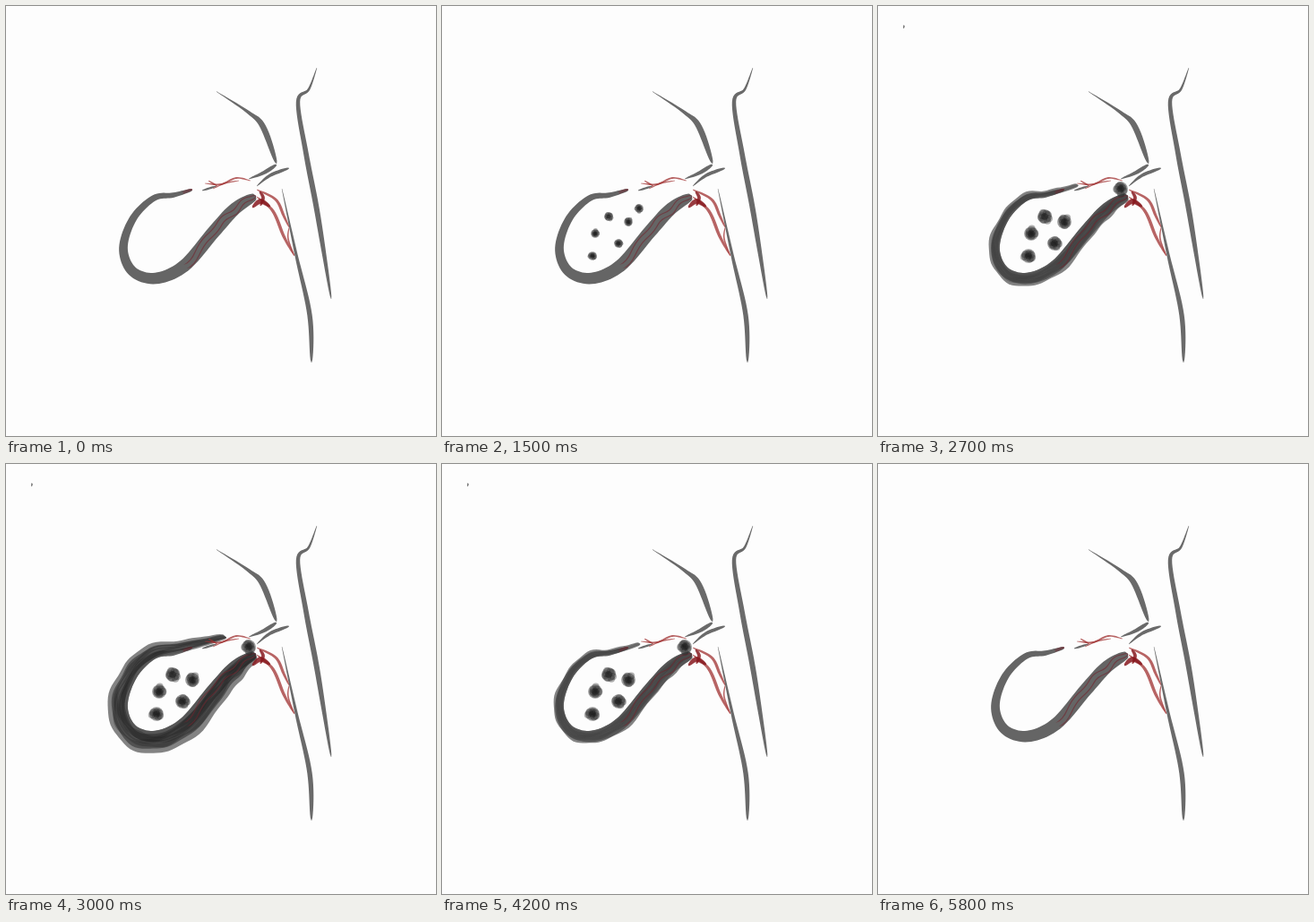
Recreate the animation shown at these times as an HTML page with a canvas. Size 480 px wide and 480 px high, loop 6800 ms.

```html
<!DOCTYPE html>
<html lang="en">
<head>
<meta charset="utf-8">
<title>Gallbladder</title>
<style>
  html, body { margin: 0; height: 100%; overflow: hidden; background: #fdfdfd; }
  canvas { display: block; width: 100vw; height: 100vh; }
</style>
</head>
<body>
<canvas id="stage" width="480" height="480"></canvas>
<script>
const ctx = document.getElementById('stage').getContext('2d');
const LOOP = 6800, STEP = 100;
const clamp = v => Math.max(0, Math.min(1, v));
const mix = (a, b, t) => a + (b - a) * t;
const noise = n => Math.abs(Math.sin(n * 127.1) * 43758.5) % 1;
const wobble = t => (Math.sin(37 * t) + Math.sin(71 * t + 1)) / 2;

// Half width of a brush stroke: thin at both ends, widest later as skew grows.
const taper = (width, skew = 1) => t => width * Math.sin(Math.PI * t ** skew) ** .6 + .2;

// Samples a Catmull-Rom curve through the key points.
function curve(keys) {
  const samples = [], segments = keys.length - 1, detail = 10;
  for (let i = 0; i <= segments * detail; i++) {
    const k = Math.min(segments - 1, Math.floor(i / detail)), u = i / detail - k;
    const [a, b, c, d] = [-1, 0, 1, 2].map(n => keys[Math.max(0, Math.min(segments, k + n))]);
    samples.push([0, 1].map(n => b[n] + u / 2 * (c[n] - a[n] +
      u * (2 * a[n] - 5 * b[n] + 4 * c[n] - d[n] + u * (3 * (b[n] - c[n]) + d[n] - a[n])))));
  }
  return samples;
}

// half and shift give the half width and sideways offset at t = 0..1.
function brush(keys, color, half, shift = () => 0) {
  const line = curve(keys), last = line.length - 1;
  const left = [], right = [];
  line.forEach(([x, y], i) => {
    const a = line[Math.max(0, i - 1)], b = line[Math.min(last, i + 1)];
    const dx = b[0] - a[0], dy = b[1] - a[1], len = Math.hypot(dx, dy), t = i / last;
    const edge = offset => [x - dy / len * offset, y + dx / len * offset];
    left.push(edge(shift(t) + half(t)));
    right.unshift(edge(shift(t) - half(t)));
  });
  ctx.beginPath();
  [...left, ...right].forEach(p => ctx.lineTo(...p));
  ctx.fillStyle = color;
  ctx.fill();
}

function drawDucts() {
  const duct = (width, skew, ...keys) => brush(keys, '#6a6a6a', taper(width, skew));
  duct(3.1, 2, [235, 95.5], [271, 119], [287, 135], [302, 176]);
  duct(2.8, 1.5, [347, 69], [338, 93], [326, 107], [335, 165], [346, 222], [354, 270], [363, 327]);
  duct(2.5, 1.8, [308, 204], [324, 278], [339, 345], [341, 398]);
  duct(2, 1.5, [271, 193], [288, 186], [302, 177]);
  duct(1.7, 1.5, [280, 201], [295, 189], [316, 181]);
  duct(.9, 1, [219, 206], [235, 201]);
}

// pull drags the open upper end towards the neck.
const wallKeys = (pull = 0) => [
  [208 + 38 * pull, 205 - 11 * pull], [187 + 19 * pull, 211 - 6 * pull], [165, 214.5], [142, 237], [131, 270],
  [141, 296], [167, 304], [199, 290], [232, 252], [256, 226], [279, 212]
];
const wallHalf = t => (3.5 + 7.5 * t * t) * (4 * t * (1 - t)) ** .35 + .2;

function drawSwelling(level) {
  const amount = level ** 1.7;
  const keys = wallKeys(mix(.35, 1, amount));
  const growth = t => mix(1.5, 13, amount) * Math.sqrt(clamp(Math.sin(Math.PI * t))) + 1.4 * wobble(t);
  const middle = t => growth(t) / 2;
  const half = t => wallHalf(t) + middle(t);
  brush(keys, 'rgba(80,80,80,.7)', half, middle);
  brush(keys, `rgba(40,40,40,${mix(.2, .55, amount)})`, t => half(t) * .66, t => middle(t) - .6 + wobble(t * .7));
  for (let i = 0; i < 4; i++) {
    brush(keys, `rgba(30,30,30,${mix(.08, .32, amount)})`, t => half(t) * (.14 + .08 * wobble(t + i)),
      t => middle(t) + half(t) * (.28 * i - .5 + .12 * wobble(t * .6 + i)));
  }
}

function drawVessels() {
  for (const side of [-1, 1]) {
    brush(wallKeys(), 'rgba(115,35,45,.6)', t => Math.abs(t - .38) > .32 ? .6 : 0,
      t => wallHalf(t) * (.4 * side + .4 * wobble(t)));
  }
  const vessel = (color, width, ...keys) => brush(keys, color, taper(width));
  const red = 'rgba(160,50,50,.75)', dark = 'rgba(135,25,30,.85)';
  vessel(red, .8, [222, 198], [240, 199], [257, 192], [273, 195]);
  vessel(red, .5, [231, 204], [244, 198], [260, 195]);
  vessel(red, .6, [226, 195], [236, 201]);
  vessel(red, 1.4, [280, 205], [301, 216], [310, 234], [316, 247]);
  vessel(red, 1.6, [280, 213], [298, 229], [310, 257], [322, 279]);
  vessel(red, .6, [316, 247], [315, 260], [322, 279]);
  vessel(dark, 2.5, [275, 225], [284, 218], [295, 224]);
  vessel(dark, 1.7, [284, 223], [287, 214], [283, 207]);
}

function circle(x, y, r, color) {
  ctx.beginPath();
  ctx.arc(x, y, r, 0, 2 * Math.PI);
  ctx.fillStyle = color;
  ctx.fill();
}

// A clump of overlapping translucent dabs.
function drawStone(x, y, r, seed) {
  circle(x, y, r * .82, 'rgba(60,60,60,.5)');
  for (let i = 0; i < 8; i++) {
    const angle = i * 2.4 + seed, reach = r * mix(.2, .6, noise(seed * 10 + i));
    circle(x + reach * Math.cos(angle), y + reach * Math.sin(angle), r * .42, 'rgba(35,35,35,.35)');
  }
  circle(x, y, r * .4, 'rgba(25,25,25,.5)');
}

const restingStones = [[186, 235], [208, 241], [171, 254], [197, 265], [168, 279]];

function draw(step) {
  const grown = clamp(Math.min(step - 10, 58 - step) / 10);
  const travel = clamp(Math.min(step - 21, 47 - step) / 4);
  const blocked = step >= 26 && step <= 42;

  ctx.fillStyle = '#fdfdfd';
  ctx.fillRect(0, 0, 480, 480);
  drawDucts();
  brush(wallKeys(), '#656565', wallHalf);
  if (blocked) {
    drawSwelling(1 - Math.abs((step - 26) % 8 - 4) / 4);
    brush([[28, 22], [29, 22.5], [28.5, 25]], '#777', taper(.6));
  }
  drawVessels();

  if (grown > 0) {
    const eased = 1 - (1 - travel) ** 1.25;
    const wanderer = [mix(mix(215, 225, grown), 271, eased), mix(mix(229, 223, grown), 204, eased)];
    [...restingStones, wanderer].forEach(([x, y], i) => drawStone(x, y, 9.6 * grown ** .7, i + 1));
  }
}

const begin = performance.now();
function frame() {
  draw(Math.floor((performance.now() - begin) % LOOP / STEP));
  requestAnimationFrame(frame);
}
frame();
</script>
</body>
</html>
```
